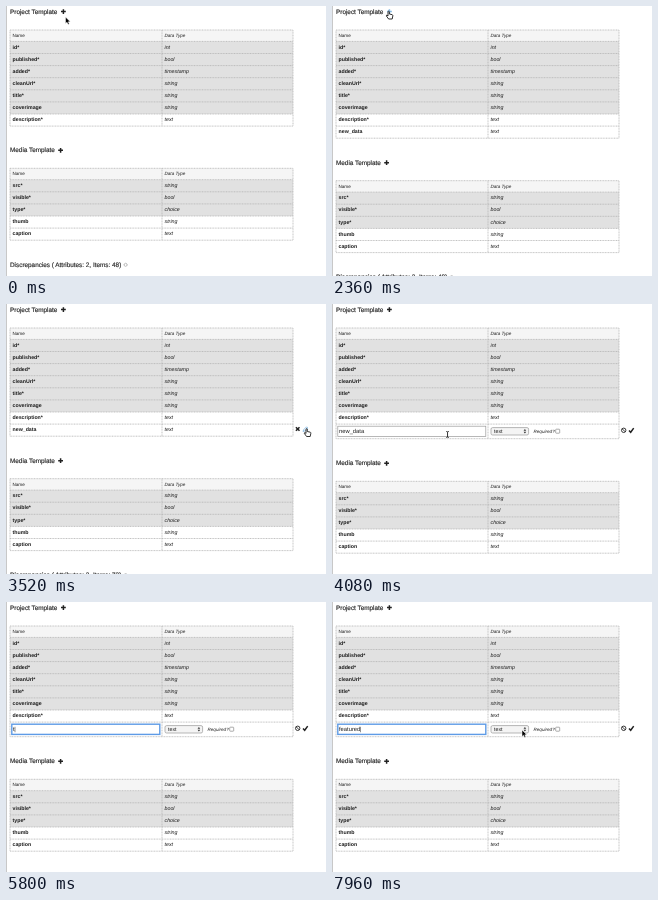
Animation of 320x270 px, one loop 8 s. Source, as an HTML page:

```html
<!DOCTYPE html>
<html>
<head>
<meta charset="utf-8">
<style>
html, body { margin: 0; width: 100%; height: 100%; overflow: hidden; background: #fff; }
svg { display: block; }
text { font-family: "Liberation Sans", Arial, sans-serif; font-size: 5.3px; fill: #1c1c1c; text-rendering: geometricPrecision; }
.title { font-size: 6.38px; fill: #2a2a2a; stroke: #2a2a2a; stroke-width: .16px; }
.head { font-size: 4.6px; }
.name { font-size: 5.25px; font-weight: bold; }
.type { font-style: italic; }
.input { font-size: 5.8px; }
.line { fill: none; stroke: #b4b4b4; stroke-width: .8; stroke-dasharray: 1 .6; }
.icon { fill: none; stroke: #222; stroke-width: 1.5; }
.thin { stroke-width: .9; }
.hover { stroke: #86b9e2; }
</style>
</head>
<body>
<svg width="320" height="270" viewBox="0 0 320 270">
  <g id="page"></g>
  <g id="cursor"></g>
</svg>
<script>
const LOOP = 8000, HEAD = 11.4, ROW = 12.1;
const project = [['id*', 'int'], ['published*', 'bool'], ['added*', 'timestamp'], ['cleanUrl*', 'string'],
  ['title*', 'string'], ['coverimage', 'string'], ['description*', 'text']];
const media = [['src*', 'string'], ['visible*', 'bool'], ['type*', 'choice'], ['thumb', 'string'], ['caption', 'text']];

// [time, text in the edit field]
const typing = [[0, 'new_data'], [5800, 't'], [6480, 'te'], [6600, 't'], [6760, ''], [6920, 'f'], [7040, 'fe'],
  [7160, 'feat'], [7360, 'featu'], [7440, 'featur'], [7520, 'feature'], [7680, 'featured']];

// [time, x, y] of the pointer tip
const path = [[0, 59.5, 11], [1000, 59.5, 11], [1200, 59, 8], [1400, 59, 8], [1600, 68.5, 11], [1720, 73, 13],
  [1840, 62, 6], [1950, 46, 5], [2080, 56, 5], [2640, 56, 5], [2860, 95, 40], [3060, 190, 100],
  [3220, 270, 123], [3440, 300, 124.5], [3880, 300, 124.5], [4080, 116, 130.5], [4260, 34, 128],
  [4520, 8, 127.5], [7680, 8, 127.5], [7790, 70, 110], [7960, 190, 128], [LOOP, 190, 128]];

const shapes = {
  arrow: '<path d="M0 0V6.6L1.5 5.2 2.6 7.6 3.8 7.1 2.8 4.8H4.8Z" fill="#000" stroke="#fff" stroke-width=".5"/>',
  hand: '<path d="M0 .6Q.7-.3 1.3.6V3L4.3 3.7Q5 4 4.8 5L4.2 8H.6L-1.6 5Q-1.8 3.9-.9 4.2L0 5Z" fill="#fff" stroke="#000" stroke-width=".8"/>',
  beam: '<path d="M-1.2-3Q0-3 0-2.2 0-3 1.2-3M0-2.2V2.2M-1.2 3Q0 3 0 2.2 0 3 1.2 3" fill="none" stroke="#000" stroke-width=".8"/>',
  none: ''
};

const text = (x, y, kind, s) => `<text x="${x}" y="${y}" class="${kind}">${s}</text>`;
const icon = (d, kind = '') => `<path d="${d}" class="icon ${kind}"/>`;
const rect = (x, y, w, h, attrs) => `<rect x="${x}" y="${y}" width="${w}" height="${h}" ${attrs}/>`;
const plus = (x, y, kind) => icon(`M${x - 2.4} ${y}h4.8M${x} ${y - 2.4}v4.8`, kind);

function table(y, rows, locked, extra = 0) {
  const bottom = y + HEAD + rows.length * ROW, end = bottom + extra;
  const fills = rect(4, y, 283, HEAD, 'fill="#f5f5f5"') +
    rect(4, y + HEAD, 283, locked * ROW, 'fill="#e1e1e1"');
  let lines = `M4 ${y}H287V${end}H4ZM156 ${y}V${end}`;
  let labels = text(6.5, y + 7, 'head', 'Name') + text(158.5, y + 7, 'head type', 'Data Type');
  rows.forEach(([name, type], i) => {
    const top = y + HEAD + i * ROW;
    lines += `M4 ${top}H287`;
    labels += text(6.5, top + 7.3, 'name', name) + text(158.5, top + 7.3, 'type', type);
  });
  if (extra) lines += `M4 ${bottom}H287`;
  return fills + `<path d="${lines}" class="line"/>` + labels;
}

function editor({ value, focused, selected }) {
  return rect(5.8, 122.2, 148, 10.2, `fill="#fff" stroke="${focused ? '#5e9be6' : '#999'}" stroke-width="${focused ? 1.4 : .7}"`) +
    (selected ? rect(7, 123.6, 25.2, 7.4, 'fill="#b4d5fe"') : '') +
    `<text x="7" y="129.2" class="input">${value}${focused && !selected ? '<tspan dx="-.4">|</tspan>' : ''}</text>` +
    rect(159, 123.6, 37.6, 7.4, 'rx="1.6" fill="#f4f4f4" stroke="#999" stroke-width=".7"') +
    text(162, 129.2, '', 'text') +
    '<path d="M191.6 126.8l1.3-1.8 1.3 1.8zM191.6 127.8l1.3 1.8 1.3-1.8z" fill="#333"/>' +
    text(201.5, 129, 'head type', 'Required?') +
    rect(223.7, 125.2, 4, 4, 'rx=".6" fill="#fff" stroke="#888" stroke-width=".7"') +
    '<circle cx="291.7" cy="126.3" r="2.2" class="icon thin"/>' + icon('M290.2 124.8l3 3', 'thin') +
    icon('M297 126.5l1.7 1.8 3-4.2');
}

function page(s) {
  const rows = s.added && !s.editing ? [...project, ['new_data', 'text']] : project;
  const shift = s.editing ? 15 : s.added ? 12.4 : 0;
  return rect(0, 0, .8, 270, 'fill="#bbb"') +
    text(4, 7.8, 'title', 'Project Template') + plus(57.4, 5.6, s.overPlus ? 'hover' : '') +
    table(24, rows, 6, s.editing ? 14.6 : 0) +
    (s.editing ? editor(s) : '') +
    (s.rowIcons ? icon('M289.9 123.2l3.6 3.6m0-3.6l-3.6 3.6') +
      icon('M297 127.5l.6-1.7 3-3 1.2 1.2-3 3z', 'thin ' + (s.overPencil ? 'hover' : '')) : '') +
    `<g transform="translate(0 ${shift})">` +
    text(4, 146.4, 'title', 'Media Template') + plus(54.6, 144.3) + table(162.3, media, 3) +
    text(4, 260.9, 'title', `Discrepancies ( Attributes: ${s.recounted ? '3, Items: 72' : '2, Items: 48'})`) +
    '<circle cx="119.6" cy="258.8" r="1.5" fill="none" stroke="#888" stroke-width=".8" stroke-dasharray="1 .3"/></g>';
}

const within = (t, a, b) => t >= a && t < b;

function pointer(t) {
  const i = path.findIndex(p => p[0] > t);
  const [t0, x0, y0] = path[i - 1], [t1, x1, y1] = path[i];
  const k = (t - t0) / (t1 - t0);
  const x = x0 + (x1 - x0) * k, y = y0 + (y1 - y0) * k;
  let kind = 'arrow';
  if (within(t, 2040, 2670) || within(t, 3400, 3900)) kind = 'hand';
  else if (within(t, 5800, 7680)) kind = 'none';
  else if (t > 3900 && x < 154 && y > 122 && y < 133) kind = 'beam';
  return { x, y, kind };
}

const pageNode = document.getElementById('page'), cursorNode = document.getElementById('cursor');
let lastPage;

function draw(now) {
  const t = now % LOOP, p = pointer(t);
  const markup = page({
    added: t >= 2280,
    recounted: t >= 2440,
    editing: t >= 3640,
    overPlus: within(t, 2040, 2670),
    rowIcons: within(t, 3200, 3640),
    overPencil: t >= 3400,
    focused: t >= 4260,
    selected: within(t, 4400, 5800),
    value: typing.findLast(k => k[0] <= t)[1]
  });
  if (markup !== lastPage) pageNode.innerHTML = lastPage = markup;
  cursorNode.innerHTML = shapes[p.kind];
  cursorNode.setAttribute('transform', `translate(${p.x} ${p.y})`);
}

const start = performance.now();
function tick() {
  draw(performance.now() - start);
  requestAnimationFrame(tick);
}
tick();
</script>
</body>
</html>
```
